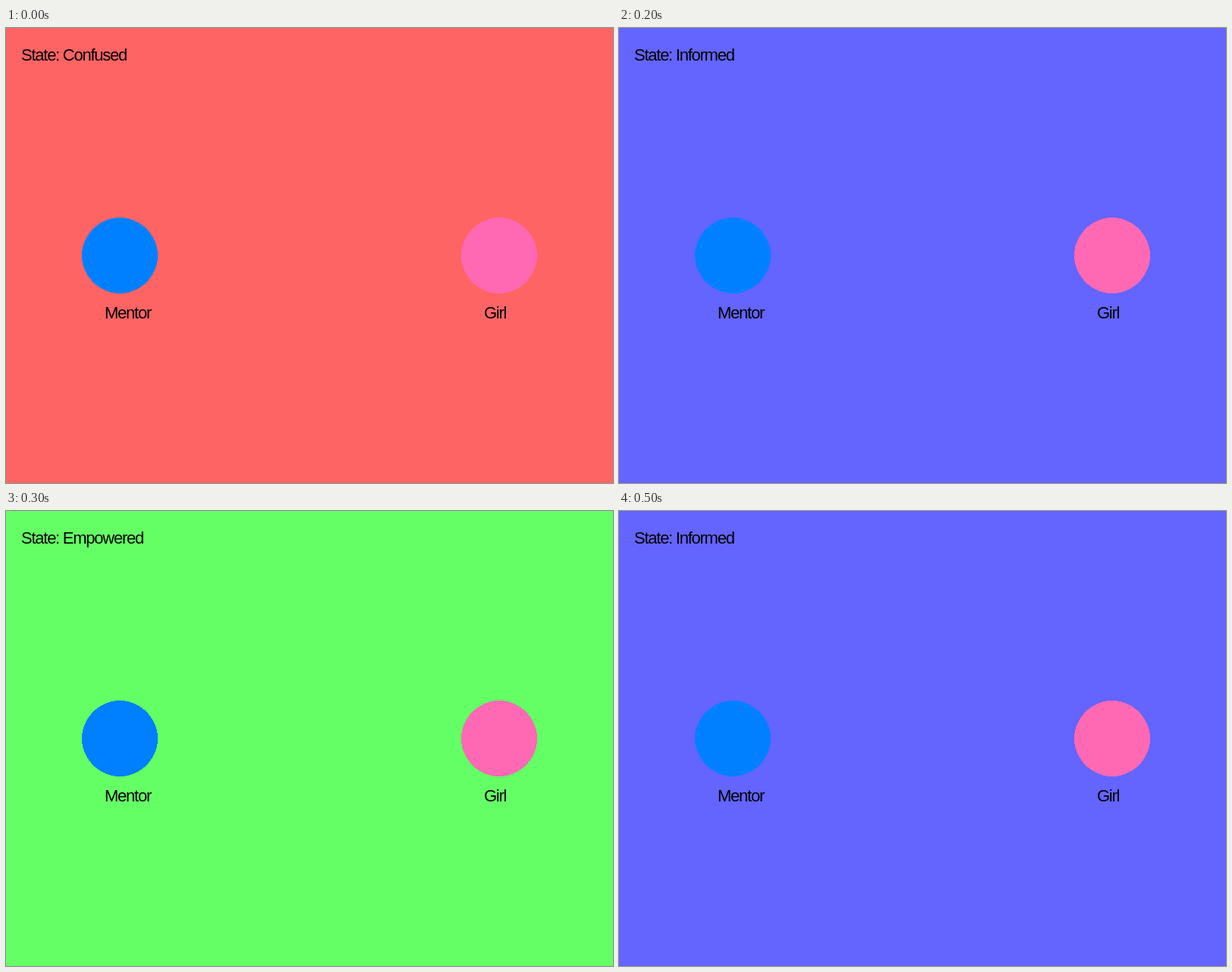
Recreate the animation shown at these times as an HTML page. Size 800x600 px, loop 0.6 s.

```html
<!DOCTYPE html>
<html lang="en">
<meta charset="utf-8">
<title>Mentor and girl</title>
<style>
  html, body { margin: 0; width: 100%; height: 100%; overflow: hidden; }
  svg { display: block; width: 100vw; height: 100vh; }
  text { font: 22px "Liberation Sans", Arial, sans-serif; letter-spacing: -1.25px; }
  path { shape-rendering: crispEdges; }
</style>
<svg viewBox="0 0 800 600">
  <rect id="back" width="800" height="600"/>
  <path class="disc" transform="translate(150 300)" fill="#0080ff"/>
  <path class="disc" transform="translate(650 300)" fill="#ff69b4"/>
  <text id="label" x="20" y="43"></text>
  <text x="130" y="383">Mentor</text>
  <text x="630" y="383">Girl</text>
</svg>
<script>
  const colors = {
    Confused: '#ff6464',
    Embarrassed: '#ffb6c1',
    Informed: '#6464ff',
    Empowered: '#64ff64',
    Unaware: '#c8c8c8'
  };
  const states = ['Confused', 'Embarrassed', 'Informed', 'Empowered', 'Unaware', 'Informed'];
  const STEP = 100;
  const back = document.getElementById('back');
  const label = document.getElementById('label');
  const start = performance.now();

  const box = (x, y) => `M${-x} ${-y}H${x}V${y}H${-x}Z`;

  // Midpoint circle with hard pixel edges, as a union of centred boxes.
  function disc(radius) {
    let x = 0, y = radius, error = 1 - radius, path = '';
    while (x < y) {
      if (error >= 0) error -= 2 * --y;
      error += 2 * ++x + 1;
      path += box(x, y) + box(y, x);
    }
    return path;
  }

  function draw() {
    const time = performance.now() - start;
    const state = states[Math.floor(time / STEP) % states.length];
    back.setAttribute('fill', colors[state]);
    label.textContent = 'State: ' + state;
    requestAnimationFrame(draw);
  }

  for (const shape of document.querySelectorAll('.disc')) shape.setAttribute('d', disc(50));
  draw();
</script>
</html>
```
